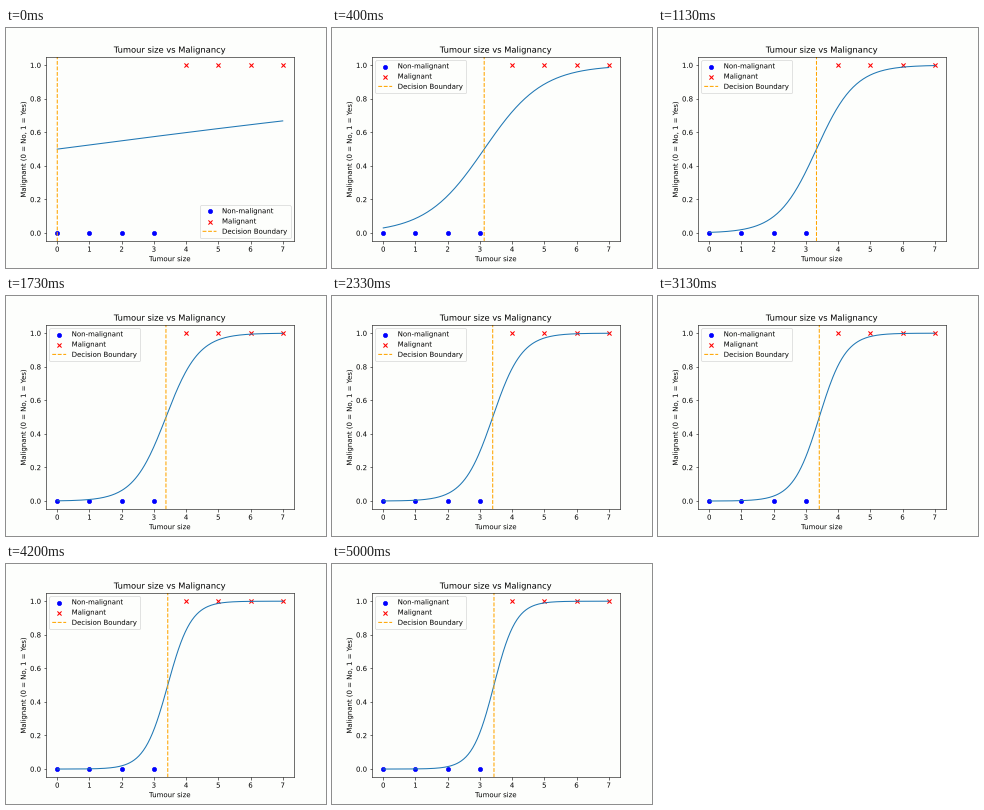
These frames come from a looping animation (320 px wide and 240 px high, 5.07 s). A matplotlib script:

```python
import matplotlib.pyplot as plt
import numpy as np
from matplotlib.animation import FuncAnimation
from matplotlib.patheffects import Normal

LOOP_MS = 5070
INTERVAL = 30
RATE = 0.1
STEPS_PER_POSE = 100
POSES = 51

# Draw text and markers as plain paths, so small sizes keep subpixel places
plt.rcParams["path.effects"] = [Normal()]
plt.rcParams["text.hinting"] = "none"
plt.rcParams["figure.facecolor"] = "#fdfefc"
plt.rcParams["axes.facecolor"] = "#fdfefc"

size = np.arange(8.0)
label = (size > 3).astype(float)


def sigmoid(z):
    return 1 / (1 + np.exp(-z))


def train():
    """Gradient descent on logistic regression, one (w, b) per pose."""
    w, b = 0.1, 0.0
    history = []
    for _ in range(POSES):
        history.append((w, b))
        for _ in range(STEPS_PER_POSE):
            error = sigmoid(w * size + b) - label
            w -= RATE * np.mean(error * size)
            b -= RATE * np.mean(error)
    return history


def pose_at(frame):
    """Ten poses per second, shown on a clock of 15 ticks per second."""
    centis = (frame * INTERVAL + INTERVAL - 10) // 10
    tick = (3 * centis + 2) // 20
    return min(tick * 2 // 3, POSES - 1)


history = train()
grid = np.linspace(0, 7, 200)

fig, ax = plt.subplots(figsize=(6.4, 4.8), dpi=50)
fig.subplots_adjust(bottom=0.1106)
ax.scatter(size[:4], label[:4], color="blue", marker="o", label="Non-malignant")
ax.scatter(size[4:], label[4:], color="red", marker="x", label="Malignant")
curve, = ax.plot(grid, grid * 0)
boundary = ax.axvline(0, color="orange", linestyle="--", label="Decision Boundary")
ax.set(
    title="Tumour size vs Malignancy",
    xlabel="Tumour size",
    ylabel="Malignant (0 = No, 1 = Yes)",
    xlim=(-0.35, 7.35),
    ylim=(-0.05, 1.05),
)
ax.set_xticks(range(8))
# "best" moves the legend once the boundary has cleared the upper left corner
legend = ax.legend(loc="best")
for line in (boundary, legend.legend_handles[-1]):
    line.set_snap(False)


def update(frame):
    w, b = history[pose_at(frame)]
    curve.set_ydata(sigmoid(w * grid + b))
    boundary.set_xdata([-b / w] * 2)
    return curve, boundary


anim = FuncAnimation(fig, update, frames=LOOP_MS // INTERVAL,
                     interval=INTERVAL, repeat=True, repeat_delay=0)
plt.show()
```
